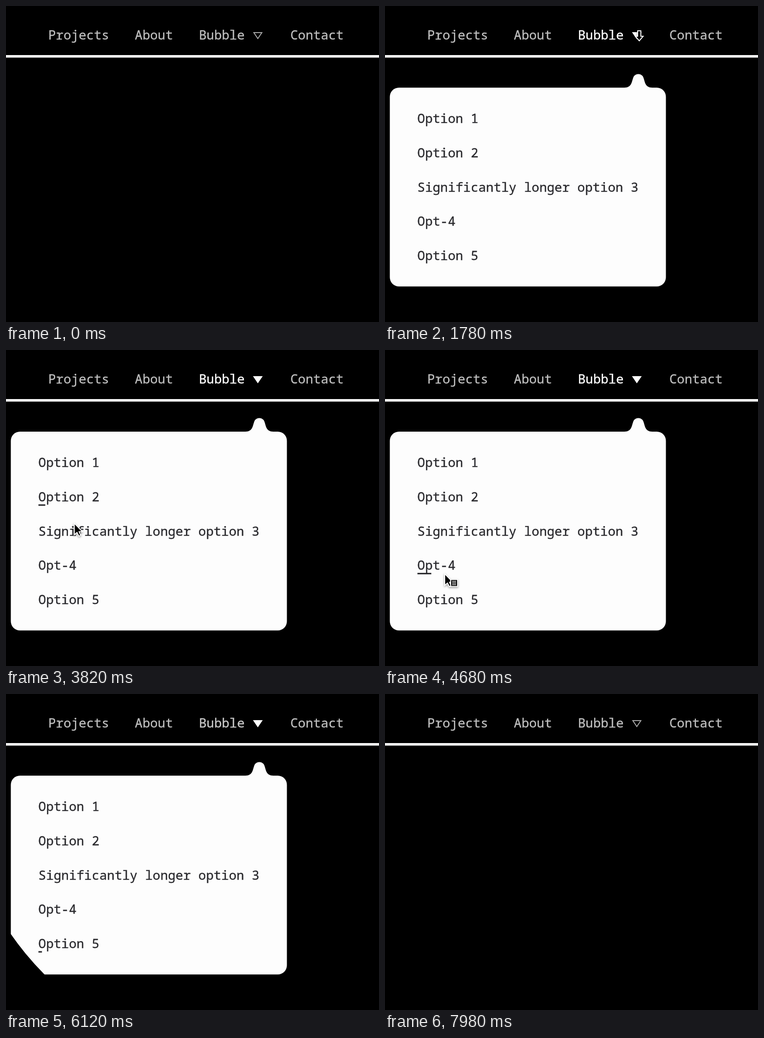
An HTML page for the animation above (8 s loop, 812 px wide and 689 px high).

```html
<!DOCTYPE html>
<html lang="en">
<head>
<meta charset="utf-8">
<title>Bubble menu</title>
<style>
  html, body { margin: 0; height: 100%; background: #000; overflow: hidden; }
  svg { display: block; width: 100%; height: 100%; }
  text {
    font: 27.65px "Noto Sans Mono", "DejaVu Sans Mono", monospace; white-space: pre;
    fill: currentColor; stroke: currentColor; stroke-width: .4;
  }
  #nav text { font-weight: 500; }
  #menu { color: #2a2a2e; }
  #menu .line { fill: currentColor; }
  #cursor { filter: drop-shadow(0 2px 2px rgba(0, 0, 0, .4)); }
  .dark { fill: #000; stroke: #fff; stroke-width: 2; }
  .light { fill: #fff; stroke: #000; stroke-width: 2; stroke-linejoin: round; }
</style>
</head>
<body>
<svg viewBox="0 0 812 689">
  <defs>
    <clipPath id="reveal"><circle id="iris" cx="551" cy="148" r="0"/></clipPath>
  </defs>
  <rect width="812" height="689"/>
  <g id="nav"></g>
  <path id="triangle" d="M539.5 58H557L548.2 71Z" stroke-width="2"/>
  <rect y="107" width="812" height="5.5" fill="#fff"/>
  <g id="menu" clip-path="url(#reveal)">
    <rect x="10.5" y="178" width="601" height="433.5" rx="20" fill="#fdfdfd"/>
    <path d="M521 179V178C537 178 537 165 540.5 156C543.5 146 559.5 146 562.5 156C566 165 566 178 582 178V179Z" fill="#fdfdfd"/>
  </g>
  <g id="cursor">
    <path id="down" class="dark" d="M-3.5 -11H3.5V1H8.5L0 11L-8.5 1H-3.5Z"/>
    <g id="hand" class="light">
      <path d="M-4 1Q-4 -2 -1 -2Q2 -2 3 1L6 9Q8 6 11 8Q14 6 16 9Q20 9 20 13Q22 20 18 24L17 27H6L4 23L-4 16Q-6 12 -2 12L1 14Z"/>
      <path d="M8 16V22M12 16V22M15.5 16V22" stroke-width="1.5"/>
    </g>
    <path id="arrow" class="dark" d="M0 0V25L6 20L10 28L14 26L10.5 18.5H18Z"/>
    <g id="badge">
      <rect class="dark" x="13" y="12.5" width="15" height="15"/>
      <path d="M16 16.5H25M16 20H25M16 23.5H25" stroke="#fff" stroke-width="1.6"/>
    </g>
  </g>
</svg>
<script>
const LOOP = 8000, ADVANCE = 16.58, FADE = 300;
const $ = id => document.getElementById(id);
const clamp = v => Math.min(1, Math.max(0, v));

// The CSS "ease" curve, cubic-bezier(.25, .1, .25, 1)
function ease(x) {
  x = clamp(x);
  let lo = 0, hi = 1;
  const bezier = (a, b, s) => 3 * a * s * (1 - s) ** 2 + 3 * b * s * s * (1 - s) + s ** 3;
  for (let i = 0; i < 20; i++) {
    const mid = (lo + hi) / 2;
    if (bezier(.25, .25, mid) < x) lo = mid; else hi = mid;
  }
  return bezier(.1, 1, lo);
}

const transition = (t, [enter, leave], length = FADE) =>
  ease((t - enter) / length) - ease((t - leave) / length);
const during = (t, [from, to]) => t >= from && t < to;

function add(parent, tag, attributes) {
  const node = document.createElementNS("http://www.w3.org/2000/svg", tag);
  for (const key in attributes) node.setAttribute(key, attributes[key]);
  return parent.appendChild(node);
}

function makeLink(parent, label, x, baseline, underline, hover) {
  const text = add(parent, "text", { x, y: baseline });
  text.textContent = label;
  const line = add(parent, "rect", { class: "line", x, y: baseline + underline, height: 3.2, fill: "#fff" });
  return { text, line, hover, width: label.length * ADVANCE };
}

const never = [LOOP, LOOP];
const bubbleHover = [1340, 5960], menuOpen = [1340, 6048], triangleFilled = [1400, 6300];

const navLinks = [
  ["Projects", 92, never], ["About", 280.6, never],
  ["Bubble", 420, bubbleHover], ["Contact", 619, [580, 1340]]
].map(([label, x, hover]) => makeLink($("nav"), label, x, 73, 8, hover));

const options = [
  ["Option 1", [2790, 3260]], ["Option 2", [3380, 3640]],
  ["Significantly longer option 3", [3830, 4340]],
  ["Opt-4", [4612, 4900]], ["Option 5", [5080, 5910]]
].map(([label, hover], i) => makeLink($("menu"), label, 70.6, 255.3 + i * 74.7, 6.5, hover));

// Pointer path: time, x, y
const path = [
  [300, 835, 70], [700, 690, 66], [1150, 645, 65], [1340, 575, 65], [1780, 553.5, 65],
  [2150, 553, 68], [2450, 440, 190], [2840, 157, 254], [3150, 152, 256], [3500, 150, 325],
  [3600, 150, 328], [3950, 148, 400], [4250, 145, 402], [4680, 130, 488], [4880, 130, 489],
  [5200, 125, 538], [5750, 122, 540], [5910, 132, 570], [6030, 150, 720]
];

function pointerAt(t) {
  const i = path.findIndex(p => p[0] > t);
  if (i < 1) return null;
  const [a, b] = [path[i - 1], path[i]];
  const k = (t - a[0]) / (b[0] - a[0]), s = k * k * (3 - 2 * k);
  return [a[1] + (b[1] - a[1]) * s, a[2] + (b[2] - a[2]) * s];
}

const show = (id, visible) => $(id).setAttribute("display", visible ? "inline" : "none");

function drawCursor(t) {
  const point = pointerAt(t);
  show("cursor", point);
  if (!point) return;
  $("cursor").setAttribute("transform", `translate(${point})`);
  const down = during(t, [1310, 2200]);
  const badge = during(t, options[3].hover);
  const hand = !down && !badge && [...navLinks.slice(3), ...options].some(link => during(t, link.hover));
  show("down", down);
  show("hand", hand);
  show("badge", badge);
  show("arrow", !down && !hand);
}

function draw(t) {
  for (const { text, line, hover, width } of navLinks) {
    const k = transition(t, hover), level = Math.round(190 + 65 * k);
    text.style.color = `rgb(${level},${level},${level})`;
    line.setAttribute("width", hover === bubbleHover ? 0 : width * k);
  }
  for (const { line, hover, width } of options)
    line.setAttribute("width", width * transition(t, hover));

  const filled = during(t, triangleFilled);
  $("triangle").setAttribute("fill", filled ? "#fff" : "none");
  $("triangle").setAttribute("stroke", filled ? "#fff" : "#aaa");
  $("iris").setAttribute("r", 800 * transition(t, menuOpen, 500));
  drawCursor(t);
}

const start = performance.now();
function frame() {
  draw((performance.now() - start) % LOOP);
  requestAnimationFrame(frame);
}
frame();
</script>
</body>
</html>
```
